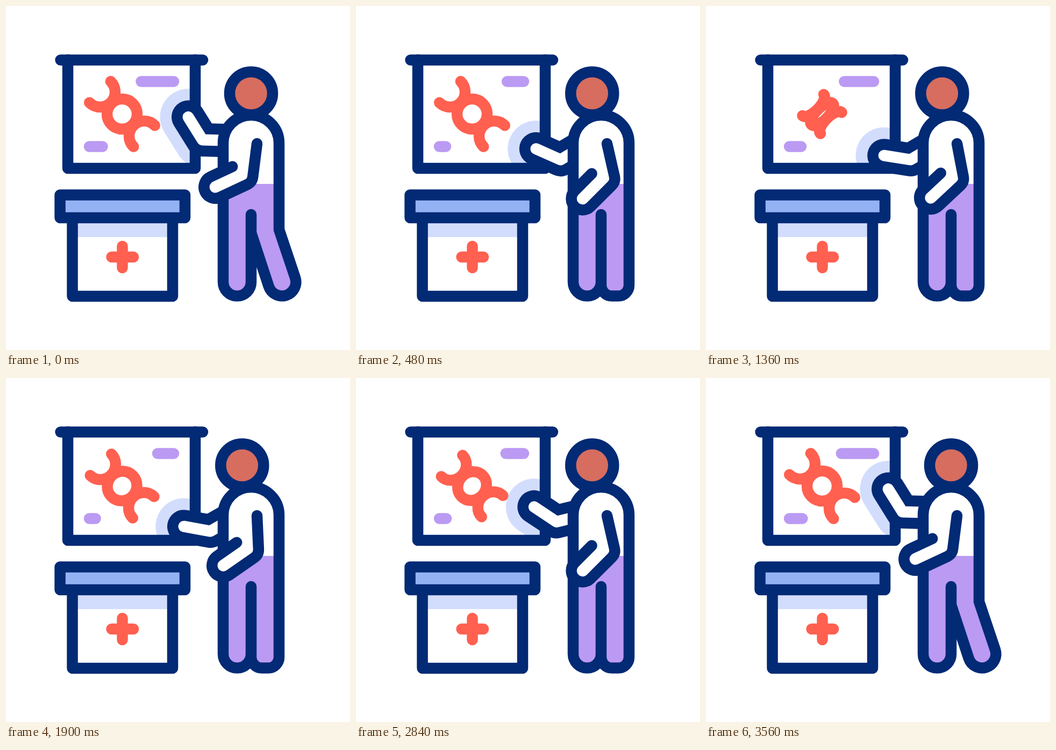
An HTML page with a canvas that plays this animation: 640x640 px, repeating every 3600 ms.

```html
<!DOCTYPE html>
<html lang="en">
<head>
<meta charset="utf-8">
<title>Presentation</title>
<style>
  html, body { margin: 0; width: 100%; height: 100%; overflow: hidden; background: #fff; }
  canvas { display: block; }
</style>
</head>
<body>
<canvas id="stage" width="640" height="640"></canvas>
<script>
const ctx = document.getElementById('stage').getContext('2d');
const LOOP = 3600, BEAT = 600;
const LINE = 20.5;
const NAVY = '#022a75', RED = '#ff6050', PURPLE = '#bb9af3';
const PALE = '#d2ddfd', BLUE = '#93b2f4', SKIN = '#d66d5f', WHITE = '#fff';

const rad = degrees => degrees * Math.PI / 180;
const progress = (t, from, to) => Math.min(1, Math.max(0, (t - from) / (to - from)));

// Eased ramp from 0 to 1.
function ease(t, from, to) {
  const x = progress(t, from, to);
  return x * x * (3 - 2 * x);
}

// Rises for one beat and falls back during the next.
const pulse = (t, from) => ease(t, from, from + BEAT) - ease(t, from + BEAT, from + 2 * BEAT);

function stroke(color, width = LINE) {
  ctx.strokeStyle = color;
  ctx.lineWidth = width;
  ctx.stroke();
}

function line(points, color, width) {
  ctx.beginPath();
  points.forEach(([x, y]) => ctx.lineTo(x, y));
  stroke(color, width);
}

function rect(x, y, w, h, color) {
  ctx.fillStyle = color;
  ctx.fillRect(x, y, w, h);
}

function drawBars(t) {
  const shrink = pulse(t % (2 * BEAT), 0);
  line([[251.5 + 33 * shrink, 140.5], [312, 140.5]], PURPLE);
  line([[155, 261.5], [179.5 - 14 * shrink, 261.5]], PURPLE);
}

// One full turn about the diagonal, flattened onto the screen.
function drawHelix(t) {
  const spin = 2 * Math.PI * progress(t, BEAT, LOOP - BEAT);
  ctx.save();
  ctx.translate(216, 201);
  ctx.rotate(Math.PI / 4);
  ctx.scale(Math.cos(spin), 1);
  ctx.beginPath();
  ctx.arc(0, 0, 28, 0, 2 * Math.PI);
  ctx.closePath();
  for (const side of [-1, 1]) {
    ctx.moveTo(side * 58, -28);
    ctx.arc(side * 58, 0, 28, -Math.PI / 2, Math.PI / 2, side > 0);
  }
  ctx.restore();
  stroke(RED);
}

function drawScreen(t, arm) {
  ctx.save();
  ctx.beginPath();
  ctx.rect(125, 110, 217, 182);
  ctx.clip();
  line(arm, PALE, 105);
  ctx.restore();
  drawBars(t);
  drawHelix(t);
  line([[115, 100], [115, 302], [352, 302], [352, 100]], NAVY);
  line([[101.5, 100.5], [366, 100.5]], NAVY);
}

function drawBox() {
  rect(124, 394, 186, 36, PALE);
  line([[123.5, 394], [123.5, 540], [310, 540], [310, 394]], NAVY);
  rect(101, 351, 232, 43, BLUE);
  ctx.beginPath();
  ctx.rect(100.5, 351.5, 232.5, 42.5);
  stroke(NAVY);
  line([[196.5, 467], [237, 467]], RED);
  line([[216.5, 447], [216.5, 487]], RED);
}

// Hand, elbow and shoulder of the arm at the screen.
function pointingArm(t) {
  const raise = .45 * ease(t, 1800, 2500) + .55 * ease(t, 2700, 3450);
  const elbowDrop = ease(t, 0, 480) - raise;
  const forearm = rad(58 - 49 * (ease(t, 0, 760) - raise));
  const x = 365.5 + 15 * elbowDrop, y = 249 + 37 * elbowDrop;
  return [[x - 50 * Math.cos(forearm), y - 50 * Math.sin(forearm)], [x, y], [440, 251]];
}

function bodyPath(turn) {
  const r = 26, corner = 20 + 6 * turn;
  const footX = 482 + 31.5 * turn, footY = 513.5;
  const tilt = Math.atan2(footX - 482, 96);
  // Point given along the foot's own axes: across and down.
  const foot = (across, down) => [
    footX + across * Math.cos(tilt) + down * Math.sin(tilt),
    footY - across * Math.sin(tilt) + down * Math.cos(tilt)
  ];
  const body = new Path2D();
  body.moveTo(456, 388);
  body.lineTo(456, 513.5);
  body.arc(430, 513.5, r, 0, Math.PI);
  body.lineTo(404, 255);
  body.arc(456, 255, 52, Math.PI, 0);
  body.lineTo(508, 416);
  body.arcTo(...foot(r, r), ...foot(0, r), corner);
  body.arcTo(...foot(-r, r), ...foot(-r, 0), corner);
  body.lineTo(456, 422);
  body.closePath();
  return body;
}

function drawBody(turn) {
  const body = bodyPath(turn);
  ctx.fillStyle = WHITE;
  ctx.fill(body);
  ctx.save();
  ctx.clip(body);
  rect(390, 331, 180, 230, PURPLE);
  ctx.restore();
  ctx.strokeStyle = NAVY;
  ctx.lineWidth = LINE;
  ctx.stroke(body);
}

function drawHead(turn) {
  ctx.beginPath();
  ctx.arc(439.3 + 16.7 * turn, 162.5, 40, 0, 2 * Math.PI);
  ctx.fillStyle = SKIN;
  ctx.fill();
  stroke(NAVY);
}

function drawSwingingArm(t, turn) {
  ctx.save();
  ctx.translate(467, 256);
  ctx.rotate(rad(1 + 20 * turn + 11 * pulse(t, 2 * BEAT)));
  ctx.beginPath();
  ctx.moveTo(0, 0);
  ctx.arcTo(17.3, 70.4, -28.5, 117.9, 18);
  ctx.arc(-43.6, 103.3, 21, rad(44), rad(224));
  ctx.lineTo(-27.4, 56.3);
  ctx.fillStyle = WHITE;
  ctx.fill();
  stroke(NAVY);
  ctx.restore();
}

function draw(t) {
  const turn = 1 - ease(t, 0, 335) + ease(t, 3122, 3457);
  const arm = pointingArm(t);
  rect(0, 0, 640, 640, WHITE);
  ctx.lineCap = ctx.lineJoin = 'round';
  drawScreen(t, arm);
  drawBox();
  line(arm, NAVY, 62);
  line(arm, WHITE, 21);
  drawHead(turn);
  drawBody(turn);
  drawSwingingArm(t, turn);
}

const start = performance.now();
function tick() {
  draw((performance.now() - start) % LOOP);
  requestAnimationFrame(tick);
}
tick();
</script>
</body>
</html>
```
